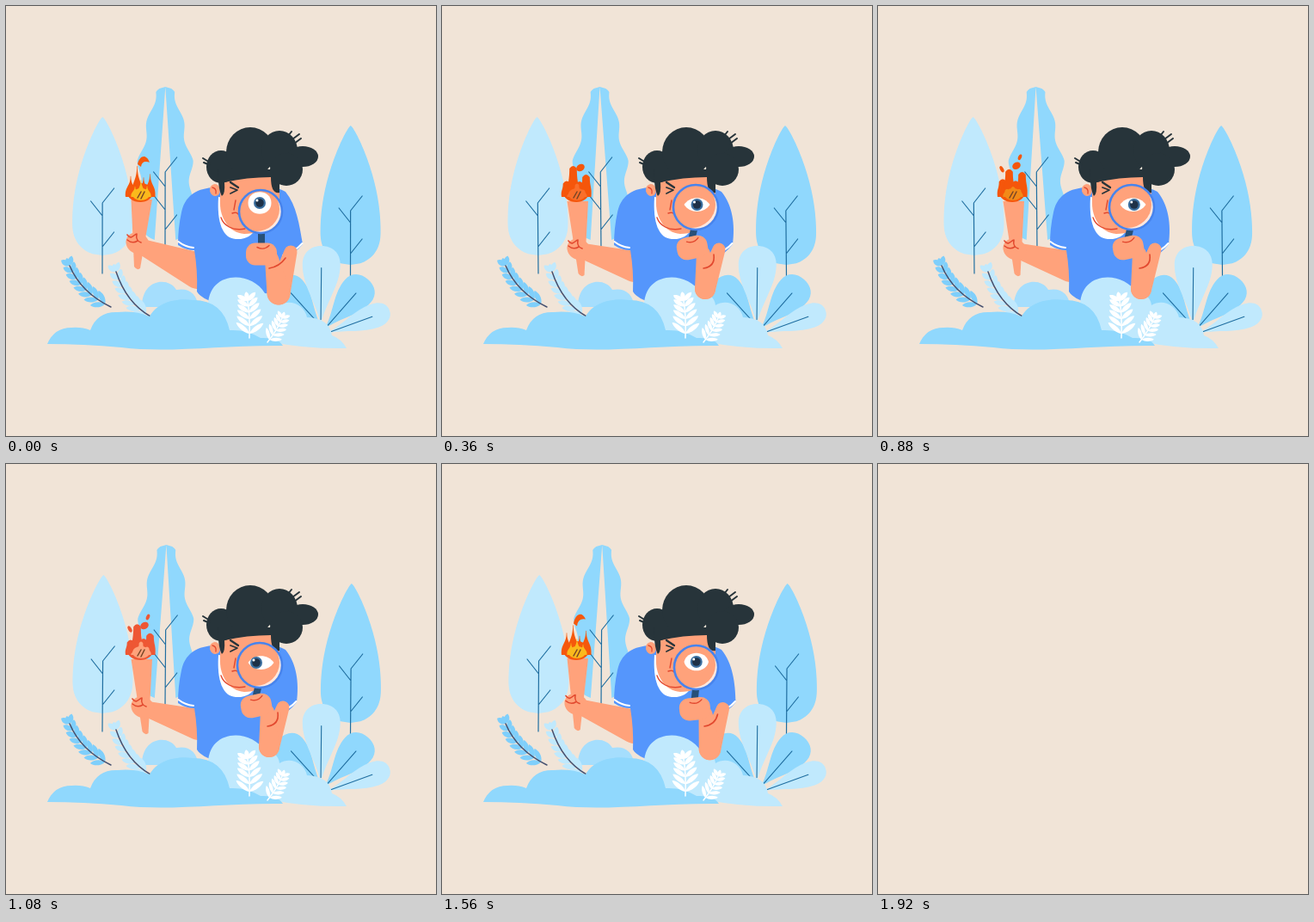
These frames come from a looping animation (500 px wide and 500 px high, 1960 ms). An HTML page with a canvas:

```html
<!DOCTYPE html>
<html lang="en">
<head>
<meta charset="utf-8">
<title>Explorer with torch</title>
<style>
html, body { margin: 0; width: 100%; height: 100%; overflow: hidden; background: #f1e4d7; }
canvas { display: block; width: 500px; height: 500px; }
</style>
</head>
<body>
<canvas id="stage" width="500" height="500"></canvas>
<script>
const ctx = document.getElementById('stage').getContext('2d');
const LOOP = 1960, STEP = 40, HIDE = 1920, TAU = Math.PI * 2;
const BG = '#f1e4d7', SKY = '#90d8fd', PALE = '#c0e9fd', NAVY = '#1f6ea0', SKIN = '#ffa27b',
      RED = '#e2492f', SHIRT = '#5596fc', HAIR = '#27343a', STEM = '#46506f';

const lerp = (a, b, k) => a + (b - a) * k;
const ease = (t, from, to) => {
  const k = Math.min(1, Math.max(0, (t - from) / (to - from)));
  return k * k * (3 - 2 * k);
};

function path(d, color, width) {
  const p = new Path2D(d);
  ctx.fillStyle = ctx.strokeStyle = color;
  ctx.lineWidth = width || 1;
  width ? ctx.stroke(p) : ctx.fill(p);
}

function oval(x, y, rx, ry, fill, turn = 0) {
  ctx.beginPath();
  ctx.ellipse(x, y, rx, ry, turn, 0, TAU);
  ctx.fillStyle = fill;
  ctx.fill();
}

// Draws in a frame whose x axis runs from (x, y) along the angle
function along(x, y, turn, paint) {
  ctx.save();
  ctx.translate(x, y);
  ctx.rotate(turn);
  paint();
  ctx.restore();
}

// Tapered capsule between two circles
function limb(x0, y0, r0, x1, y1, r1, fill) {
  along(x0, y0, Math.atan2(y1 - y0, x1 - x0), () => {
    const len = Math.hypot(x1 - x0, y1 - y0), a = Math.acos((r0 - r1) / len);
    ctx.beginPath();
    ctx.arc(0, 0, r0, a, TAU - a);
    ctx.arc(len, 0, r1, -a, a);
    ctx.fillStyle = fill;
    ctx.fill();
  });
}

function leaf(x, y, len, wide, turn, fill) {
  along(x, y, turn, () => path(
    `M0 0C${len * .3} ${-wide} ${len * .8} ${-wide * .8} ${len} 0C${len * .8} ${wide * .8} ${len * .3} ${wide} 0 0Z`, fill));
}

// Stem from base to tip with leaf pairs and one leaf at the end
function frond([x0, y0, cx, cy, x1, y1], count, len, wide, fill, stem, spread) {
  for (let i = 0; i <= count; i++) {
    const k = .1 + .9 * i / count, q = 1 - k;
    const x = q * q * x0 + 2 * q * k * cx + k * k * x1;
    const y = q * q * y0 + 2 * q * k * cy + k * k * y1;
    const dir = Math.atan2(q * (cy - y0) + k * (y1 - cy), q * (cx - x0) + k * (x1 - cx));
    const size = len * (1 - .35 * k);
    for (const side of [-1, 1]) leaf(x, y, size, wide, dir + side * spread, fill);
    if (i === count) leaf(x, y, size * .8, wide, dir, fill);
  }
  path(`M${x0} ${y0}Q${cx} ${cy} ${x1} ${y1}`, stem, 1.5);
}

// Round-ended leaf with a vein
function petal(x0, y0, x1, y1, w, fill) {
  const len = Math.hypot(x1 - x0, y1 - y0);
  along(x0, y0, Math.atan2(y1 - y0, x1 - x0), () => {
    ctx.beginPath();
    for (const s of [-1, 1]) {
      ctx.moveTo(0, 0);
      ctx.bezierCurveTo(len * .3, s * w * .3, len * .5, s * w, len * .76, s * w);
      ctx.bezierCurveTo(len * .92, s * w, len, s * w * .55, len, 0);
    }
    ctx.fillStyle = fill;
    ctx.fill();
    path(`M${len * .06} 0H${len * .72}`, NAVY, 1.1);
  });
}

// Crown from a half-width rule; branches are given as [side, height of fork]
function tree(x, top, low, base, sway, fill, half, branches) {
  const c = -sway / (base - top);
  ctx.save();
  ctx.transform(1, 0, c, 1, -c * base, 0);
  ctx.beginPath();
  for (const s of [-1, 1]) {
    ctx.moveTo(x, top);
    for (let i = 0; i <= 90; i++) ctx.lineTo(x + s * half(i / 90), lerp(top, low, i / 90));
  }
  ctx.fillStyle = fill;
  ctx.fill();
  path(`M${x} ${base}V${branches[0][1]}` +
    branches.map(([s, y]) => `M${x} ${y}l${s * 13.5} -17`).join(''), NAVY, 1.2);
  ctx.restore();
}

const cone = w => u => w * (u < .76
  ? Math.sin(u / .76 * Math.PI / 2) ** .8
  : Math.sqrt(Math.max(0, 1 - ((u - .76) / .24) ** 2.4)));

function wavy(u) {
  const w = Math.min(30, 10 + 42 * u) + 2.5 * Math.cos((u - .22) / .26 * TAU);
  const head = u < .075 ? Math.sqrt(169 - (13 - 180 * u) ** 2) : 99;
  const foot = u > .85 ? Math.sqrt(1 - ((u - .85) / .15) ** 2) : 1;
  return Math.min(w, head) * foot;
}

function trees(t) {
  const sway = 1.5 * Math.cos((t - 110) / 500 * TAU);
  tree(112, 129, 290, 311, sway, PALE, cone(35), [[1, 229], [-1, 244], [1, 280]]);
  tree(185, 94, 274, 283, sway, SKY, wavy, [[1, 193], [-1, 210], [-1, 237], [1, 260]]);
  tree(400.5, 139, 301, 315, sway, SKY, cone(35), [[1, 238], [-1, 252], [1, 288]]);
}

function rightLeaves() {
  petal(366, 372, 318, 319, 20, SKY);
  petal(366, 370, 367, 279, 22, PALE);
  petal(371, 375, 421, 318, 20, SKY);
  petal(374, 380, 446, 354, 14, PALE);
}

function leftArm(k) {
  limb(lerp(158, 164, k), lerp(280, 285, k), 9, 224, lerp(308, 303, k), lerp(21, 18, k), SKIN);
}

// Tongue of fire standing on (x, y); blunt widens its tip
function tongue(x, y, w, h, blunt, fill) {
  const tip = y - h;
  path(`M${x - w} ${y}C${x - w * 1.2} ${y - h * .5} ${x - blunt} ${y - h * .5} ${x - blunt} ${tip}` +
    `Q${x} ${tip - blunt * 1.4} ${x + blunt} ${tip}` +
    `C${x + blunt} ${y - h * .5} ${x + w * 1.2} ${y - h * .5} ${x + w} ${y}Z`, fill);
}

// Burning stages: end time, flame, core
const STAGES = [[180, '#f5580c', '#fbb91c'], [540, '#f5560b', '#fa6f2b'], [900, '#f5560b', '#f28a18'],
                [1220, '#ee5734', SKIN], [LOOP, '#f5580c', '#fbb91c']];

function fire(t) {
  const [, flame, core] = STAGES.find(s => t < s[0]);
  const dull = ease(t, 100, 260) - ease(t, 1140, 1300);
  const flick = i => 2 * Math.sin(t / 60 + i * 2);

  oval(156, 217, 15, 11, flame);
  [24, 34, 24, 27].forEach((h, i) =>
    tongue(145 + i * 7.5, 222, 6, h + flick(i) - dull * (i % 2 ? 3 : 8), .3 + dull * 4, flame));
  oval(157, 219, 10, 7, core);
  [12, 18, 14].forEach((h, i) => tongue(150 + i * 7, 222, 4.5, h + flick(i) - dull * 6, .3 + dull * 2, core));

  if (dull < .5) {
    path(`M153 ${184 + flick(0)}C155 174 163 171 167 ${180 + flick(1)}Q158 179 157 ${187 + flick(0)}Z`, flame);
  } else {
    const rise = t % 360 / 72;
    oval(161, 188 - rise, 5, 4, flame, -.5);
    if (t > 540) {
      oval(144, 192 - rise, 2, 4, flame, -.5);
      oval(165, 178 - rise, 2, 3.5, flame, .4);
    }
  }
}

function torch(t, k) {
  const glow = Math.abs(t - 1360) < 130;
  const x = lerp(152.5, 162, k), y = lerp(305, 313, k), top = lerp(225, 227, k);
  path(`M145.500 ${top}H170L${x + 3.5} ${y}Q${x} ${y + 3} ${x - 3.5} ${y - 2}Z`, glow ? '#fcc437' : SKIN);
  fire(t);
  path('M153 223l4 -7M157 224l4 -8', '#784627', 1.5);

  along(lerp(0, 6, k), lerp(0, 7, k), 0, () => {
    oval(153, 276, 14, 12, SKIN, .5);
    path('M141 266C146 273 149 265 152 265C151 270 153 274 157 275M141 272Q147 277 153 273', RED, 1.6);
  });
}

function torso(k) {
  const edge = lerp(345, 338, k), side = lerp(321, 318, k);
  path(`M246 211C228 211 209 216 204 240Q200 258 200 278Q209 284 219 284Q223 308 222 332` +
    `C231 348 280 354 308 348Q319 320 ${side} 292Q${edge - 9} 289 ${edge} 277` +
    `C341 254 338 232 325 216C312 207 268 207 246 211Z`, SHIRT);
  path(`M200.500 274Q208 280 218 281M${side + 1} ${lerp(290, 285, k)}Q${edge - 9} 286 ${edge - .5} 276`, '#fff', 2);
}

function head() {
  path('M247 222C245 252 252 270 267 271Q284 272 290 259L288 229Z', '#fff');
  oval(243, 214, 6, 7, SKIN, -.2);
  path('M240 211Q245 212 244 218', RED, 1.3);
  path('M249 196H318V225C315 248 302 265 277 265C259 264 249 246 249 230Z', SKIN);
  path('M250 246C253 255 263 262 278 259M267 226L265 237M263 241Q268 239 270 242', RED, 1.4);

  // Curls
  oval(250, 187, 17, 19, HAIR);
  oval(284, 170, 28, 29, HAIR);
  oval(318, 168, 21, 23, HAIR);
  oval(345, 175, 18, 12, HAIR);
  oval(326, 190, 19, 19, HAIR);
  path('M247 190H318V217Q308 219 308 199Q280 199 254 205Q255 219 251 221Q246 212 247 190Z', HAIR);
  path('M328 151l4 -5M333 155l8 -6M335 160l8 -6M229 177l8 5M230 182l7 3', HAIR, 2);

  path('M261 205L270 211', HAIR, 2.3);
  path('M261 211L269 214L261 218', HAIR, 1.7);
}

function eye(x, y, k, look) {
  const w = lerp(13.5, 15, k), h = lerp(17, 10.5, k), bow = lerp(1, .55, k) * w;
  path(`M${x - w} ${y}C${x - bow} ${y - h} ${x + bow} ${y - h} ${x + w} ${y}` +
    `C${x + bow} ${y + h} ${x - bow} ${y + h} ${x - w} ${y}Z`, '#fff');
  oval(x + look, y, 7, 7, '#3b6f9f');
  oval(x + look, y, 4.8, 4.8, '#1e3147');
  oval(x + look - 3, y - 3, 1.5, 1.5, '#fff');
}

function magnifier(t, k) {
  const x = lerp(296, 295, k), y = lerp(239, 234, k), r = lerp(25, 26, k);
  ctx.lineCap = 'butt';
  path(`M${lerp(297, 293, k)} ${y + r}L${lerp(297, 289, k)} ${lerp(282, 277, k)}`, '#285078', 8);
  ctx.lineCap = 'round';
  ctx.save();
  ctx.beginPath();
  ctx.arc(x, y, r, 0, TAU);
  ctx.clip();
  oval(x, y, r, r, '#ffe8df');
  oval(x - 5, y - 3, r + 2, r + 1, SKIN);
  ctx.restore();
  const look = 5 * ease(t, 440, 620) - 10.5 * ease(t, 800, 1000) + 5.5 * ease(t, 1140, 1340);
  eye(lerp(295, 296.5, k), lerp(229, 231, k), k, look);
  ctx.beginPath();
  ctx.arc(x, y, r, 0, TAU);
  ctx.strokeStyle = '#4784ed';
  ctx.lineWidth = 2.6;
  ctx.stroke();
}

function rightArm(k) {
  const x = lerp(317, 306, k), y = lerp(334, 329, k), r = lerp(13.5, 12, k);
  limb(lerp(331, 322, k), lerp(286, 283, k), 7.5, x, y, r, SKIN);
  limb(lerp(309, 304, k), lerp(294, 288, k), 8, x, y, r, SKIN);
  path(`M${lerp(306, 304, k)} 305Q318 303 ${lerp(325, 316, k)} ${lerp(293, 289, k)}`, RED, 1.6);
}

function rightHand(k) {
  along(lerp(297, 291, k), lerp(288.5, 281, k), -.2 * k, () => {
    ctx.beginPath();
    ctx.roundRect(-18, -13, 36, 26, 11);
    ctx.fillStyle = SKIN;
    ctx.fill();
    path('M-5 -8Q3 -4 9 -10', RED, 1.4);
  });
}

function bushes() {
  path('M158 350C158 316 190 315 198 330Q220 326 224 350Z', '#a5defd');
  frond([122, 350, 87, 333, 74, 302], 7, 18, 4.5, '#7fcffb', STEM, .6);
  frond([168, 361, 140, 345, 128, 309], 7, 18, 4.5, PALE, STEM, .6);
  path('M235 352C233 307 285 307 301 334Q316 334 318 348C331 340 347 348 350 362Q376 363 379 383Q390 387 396 398' +
    'Q350 399 310 391L240 387Z', PALE);
  path('M48 393Q56 374 76 374Q88 373 98 377Q106 355 130 356Q150 354 167 361C176 344 199 339 218 342' +
    'Q252 342 260 377Q280 376 296 386Q316 385 322 395C250 394 190 404 134 397Q90 393 48 393Z', SKY);
  frond([283, 386, 284, 360, 281, 343], 5, 21, 4, '#fff', '#fff', .9);
  frond([304, 391, 316, 376, 321, 363], 5, 15, 3, '#fff', '#fff', .9);
}

function draw(t) {
  ctx.fillStyle = BG;
  ctx.fillRect(0, 0, 500, 500);
  if (t >= HIDE) return;
  ctx.lineCap = ctx.lineJoin = 'round';
  const k = ease(t, 0, 320) - ease(t, 1400, 1720);
  trees(t);
  rightLeaves();
  leftArm(k);
  torch(t, k);
  torso(k);
  head();
  bushes();
  rightArm(k);
  magnifier(t, k);
  rightHand(k);
}

const start = performance.now();
function tick() {
  const t = (performance.now() - start) % LOOP;
  draw(Math.floor(t / STEP) * STEP);
  requestAnimationFrame(tick);
}
tick();
</script>
</body>
</html>
```
